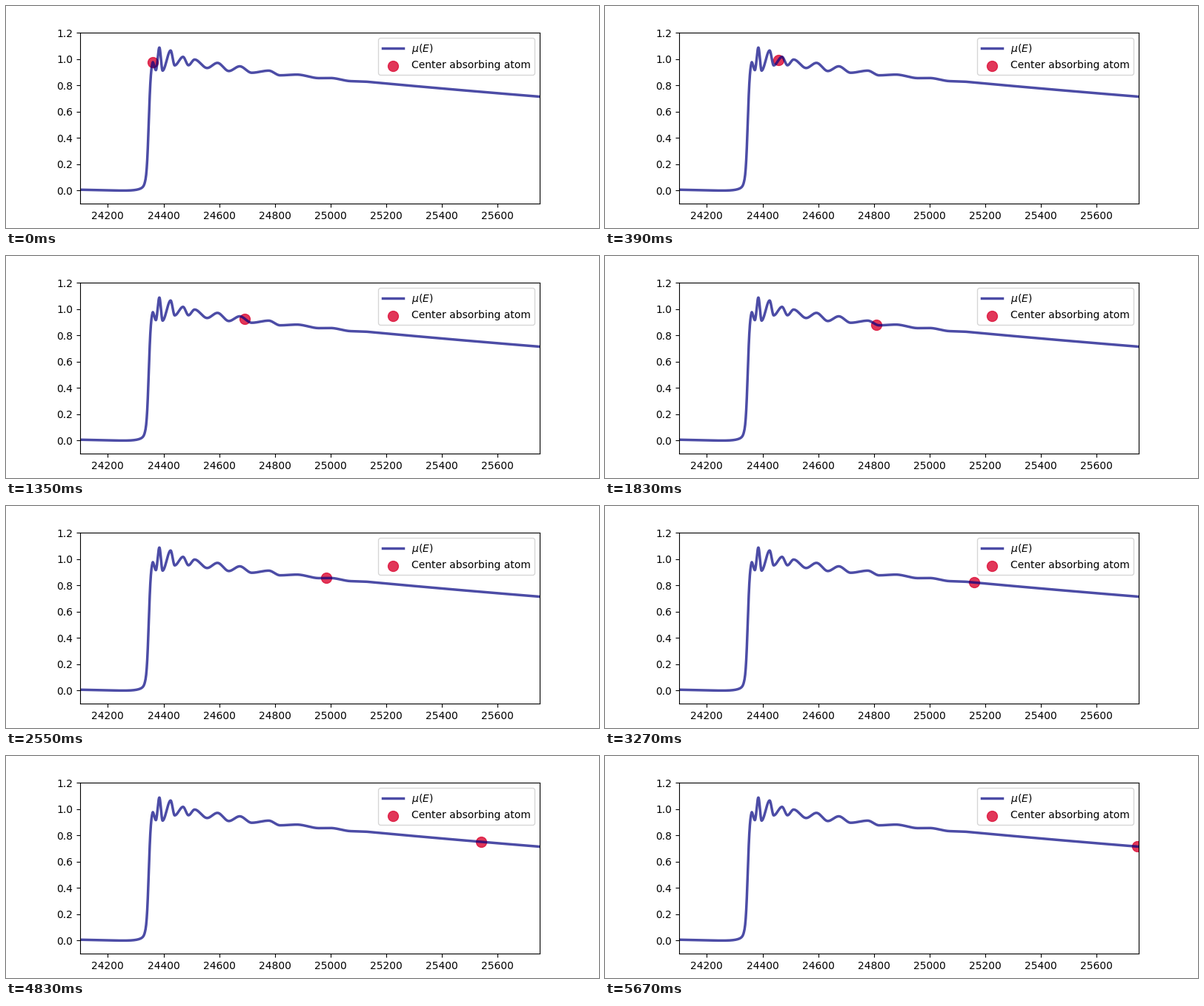
Write a matplotlib script that moves like this. It is 800 by 300 pixels and loops after 5.7 s.

```python
import numpy as np
import matplotlib.pyplot as plt
from matplotlib.animation import FuncAnimation

FRAMES, INTERVAL = 190, 30
E0 = 24350.6                # absorption edge, eV
DOT_FROM, DOT_TO = 11, 1395  # dot path above the edge, eV

# Crests and troughs above the edge: (eV above E0, mu)
TURNS = np.array([
    (10.5, .976), (22, .915), (34.5, 1.087), (46, .911), (75, 1.064),
    (89.5, .951), (119.5, 1.016), (139, .952), (161, .9955), (206, .931),
    (243, .970), (284, .908), (323, .944), (366, .895), (427, .911),
    (468, .8755), (528, .881), (608, .854), (648, .855), (725, .831),
    (778, .827),
])


def edge(e):
    """Sloping baseline, slow foot and steep step."""
    base = -5e-5 * (e + 140)
    foot = 0.04 * np.exp(np.minimum(0, (e + 17) / 22))
    step = 0.97 * (0.5 + 0.5 * np.tanh((e + 3.6) / 8))
    return base + foot + step


def ripple(e):
    """Ease smoothly from each turning point to the next."""
    x, y = TURNS.T
    i = np.clip(np.searchsorted(x, e) - 1, 0, len(x) - 2)
    t = np.clip((e - x[i]) / (x[i + 1] - x[i]), 0, 1)
    return y[i] + (y[i + 1] - y[i]) * t * t * (3 - 2 * t)


def mu(e):
    (start, _), (end, last) = TURNS[0], TURNS[-1]
    decay = last * np.exp((end - e) / 4200)
    return np.where(e < start, edge(e), np.where(e < end, ripple(e), decay))


fig, ax = plt.subplots(figsize=(8, 3), dpi=100)
energy = np.arange(-300, 1500, 1.0)
ax.plot(E0 + energy, mu(energy), color="navy", lw=2.5, alpha=0.7,
        label=r"$\mu(E)$")
dot = ax.scatter([E0 + DOT_FROM], [mu(DOT_FROM)], s=100, color="crimson",
                 alpha=0.85, label="Center absorbing atom")
ax.set_xlim(E0 - 250, E0 + 1400)
ax.set_ylim(-0.1, 1.2)
ax.set_xticks(np.arange(24200, 25601, 200))
ax.set_yticks(np.arange(7) * 0.2)
ax.legend(loc="upper right")


def update(frame):
    e = DOT_FROM + (DOT_TO - DOT_FROM) * frame / (FRAMES - 1)
    dot.set_offsets([(E0 + e, float(mu(e)))])
    return dot,


anim = FuncAnimation(fig, update, frames=FRAMES, interval=INTERVAL,
                     repeat=True, repeat_delay=0)
plt.show()
```
